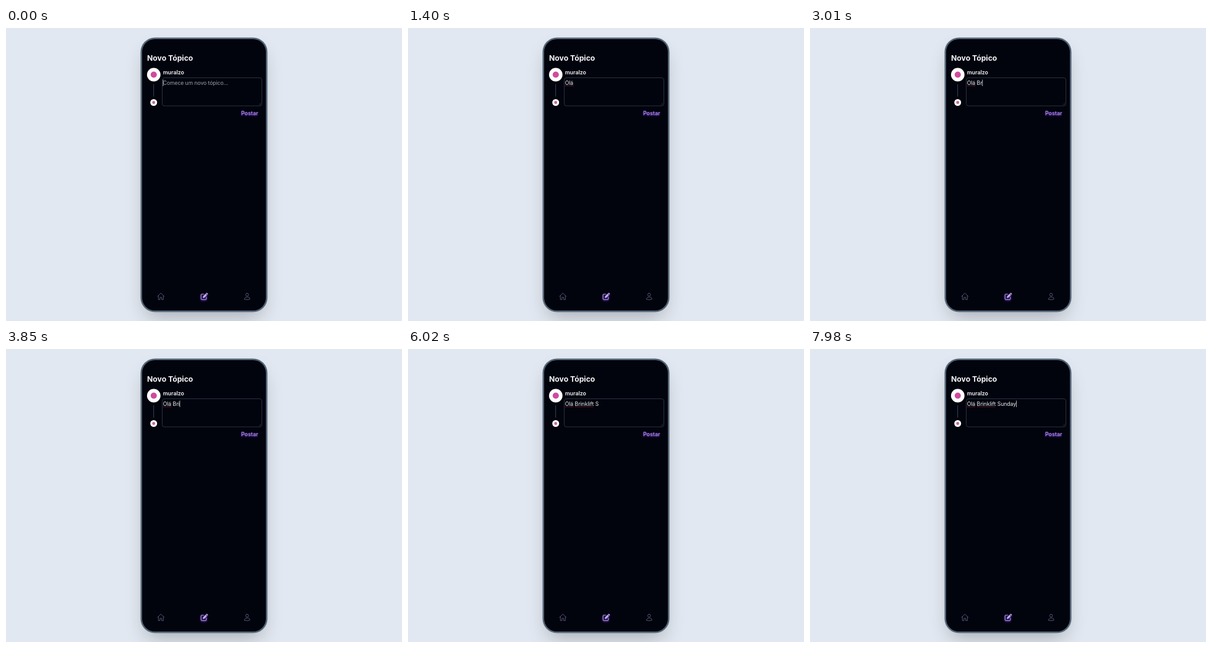
These frames come from a looping animation (640 px wide and 474 px high, 8 s). An HTML page with a canvas:

```html
<!DOCTYPE html>
<html lang="pt-BR">
<head>
<meta charset="utf-8">
<title>Novo Tópico</title>
<style>
  html, body { margin: 0; width: 100%; height: 100%; overflow: hidden; background: #e2e8f1; }
  canvas { display: block; width: 640px; height: 474px; }
</style>
</head>
<body>
<canvas id="stage"></canvas>
<script>
const W = 640, H = 474, LOOP = 8000, BLINK = 500;
const FONT = 'Inter, "Liberation Sans", sans-serif';
const MESSAGE = 'Olá Brinklift Sunday';
// Time at which each character of the message is typed.
const KEYS = [70, 420, 700, 840, 2100, 2800, 3430, 4200, 4340, 4410,
  4550, 4690, 4830, 5040, 5460, 6510, 6650, 6720, 6860, 6960];
const TEXT_X = 253.7, TEXT_Y = 91.5;

const canvas = document.getElementById('stage');
const ctx = canvas.getContext('2d');
const dpr = window.devicePixelRatio || 1;
canvas.width = W * dpr;
canvas.height = H * dpr;
ctx.scale(dpr, dpr);

function roundRect(x, y, w, h, r) {
  ctx.beginPath();
  ctx.roundRect(x, y, w, h, r);
}

function disc(x, y, r, color) {
  ctx.fillStyle = color;
  ctx.beginPath();
  ctx.arc(x, y, r, 0, Math.PI * 2);
  ctx.fill();
}

function label(text, x, y, size, weight, color) {
  ctx.font = `${weight} ${size}px ${FONT}`;
  ctx.fillStyle = color;
  ctx.fillText(text, x, y);
}

function strokePath(d, color, width) {
  ctx.strokeStyle = color;
  ctx.lineWidth = width;
  ctx.lineCap = ctx.lineJoin = 'round';
  ctx.stroke(new Path2D(d));
}

function withShadow(color, blur, dy, draw) {
  ctx.save();
  ctx.shadowColor = color;
  ctx.shadowBlur = blur * dpr;
  ctx.shadowOffsetY = dy * dpr;
  draw();
  ctx.restore();
}

function drawPhone() {
  ctx.fillStyle = '#e2e8f1';
  ctx.fillRect(0, 0, W, H);
  withShadow('rgba(0,0,0,.25)', 31, 15.5, () => {
    ctx.fillStyle = '#475569';
    roundRect(225.5, 23.5, 189, 428, 16);
    ctx.fill();
  });
  ctx.fillStyle = '#526477';
  roundRect(217.5, 15.5, 205, 444, 23);
  ctx.fill();
  ctx.fillStyle = '#02040d';
  roundRect(220, 18, 200, 439, 20.5);
  ctx.fill();
}

function drawHeader() {
  label('Novo Tópico', 228, 52.5, 12.2, 700, '#f4f6fa');
  disc(238.8, 75.5, 10.9, '#ffffff');
  disc(238.8, 75.5, 5, '#cf4b9c');
  disc(238.7, 120.5, 5.5, '#ffffff');
  disc(238.7, 120.5, 2.4, '#c06a94');
  ctx.fillStyle = '#303a4a';
  ctx.fillRect(238, 91, 1.2, 20);
  label('muralzo', 253.7, 74.5, 8.8, 600, '#f4f6fa');
}

function drawField() {
  ctx.strokeStyle = '#27303f';
  ctx.lineWidth = 1;
  roundRect(252.5, 80.5, 161, 45.5, 3.5);
  ctx.stroke();
  strokePath('M409 124.2l3-3M411 124.2l1-1', '#3b4454', 0.6);
  withShadow('#6d28d9', 3, 1.2, () =>
    label('Postar', 380, 141, 8.8, 600, '#a68bd8'));
}

function drawNav() {
  const dim = '#5a5678';
  strokePath('M244.8 434.3L250.3 428.8L255.8 434.3M246.3 433V439.4H248.9V435.8H251.7V439.4H254.3V433',
    dim, 0.95);
  strokePath('M389.7 429.1a2.3 2.3 0 1 1 0 4.6a2.3 2.3 0 1 1 0 -4.6M385.3 438.8a4.4 3.7 0 0 1 8.8 0Q389.7 440.5 385.3 438.8',
    dim, 0.95);
  withShadow('#7c3aed', 3, 1, () => {
    strokePath('M319.3 430.5H316.8Q315.2 430.5 315.2 432V437.8Q315.2 439.3 316.8 439.3H322.4Q323.9 439.3 323.9 437.8V435.2',
      '#a891d3', 1.2);
    ctx.fillStyle = '#c2b3dc';
    ctx.fill(new Path2D('M317.9 436.8L318.6 433.9L322.7 429.8L324.9 432L320.8 436.1Z'));
    ctx.fill(new Path2D('M323.2 429.3L324 428.6Q324.6 428.2 325.2 428.7L326 429.5Q326.4 430.1 325.9 430.7L325.3 431.4Z'));
  });
}

function spellMark(start, end) {
  const from = TEXT_X + ctx.measureText(MESSAGE.slice(0, start)).width;
  const to = TEXT_X + ctx.measureText(MESSAGE.slice(0, end)).width;
  ctx.fillStyle = '#a52a35';
  for (let x = from + 0.3; x < to - 0.5; x += 2) ctx.fillRect(x, 93.2, 1.1, 0.9);
}

function drawTyping(t) {
  const count = KEYS.filter(key => key <= t).length;
  const typed = MESSAGE.slice(0, count);
  if (count) label(typed, TEXT_X, TEXT_Y, 8.6, 400, '#f1f4f8');
  else label('Comece um novo tópico...', TEXT_X, TEXT_Y, 8.5, 400, '#9ca3af');

  let start = 0;
  for (const word of MESSAGE.split(' ').slice(0, 2)) {
    const end = start + word.length;
    if (count > end) spellMark(start, end);
    start = end + 1;
  }

  const lastKey = count ? KEYS[count - 1] : 0;
  if (Math.floor((t - lastKey) / BLINK) % 2 === 0) {
    ctx.fillStyle = '#dfe4ec';
    ctx.fillRect(TEXT_X + ctx.measureText(typed).width - 0.1, 83.5, 0.8, 10.5);
  }
}

function render(now) {
  drawPhone();
  drawHeader();
  drawField();
  drawNav();
  drawTyping((now - begin) % LOOP);
  requestAnimationFrame(tick);
}

const tick = () => render(performance.now());
const begin = performance.now();
tick();
</script>
</body>
</html>
```
